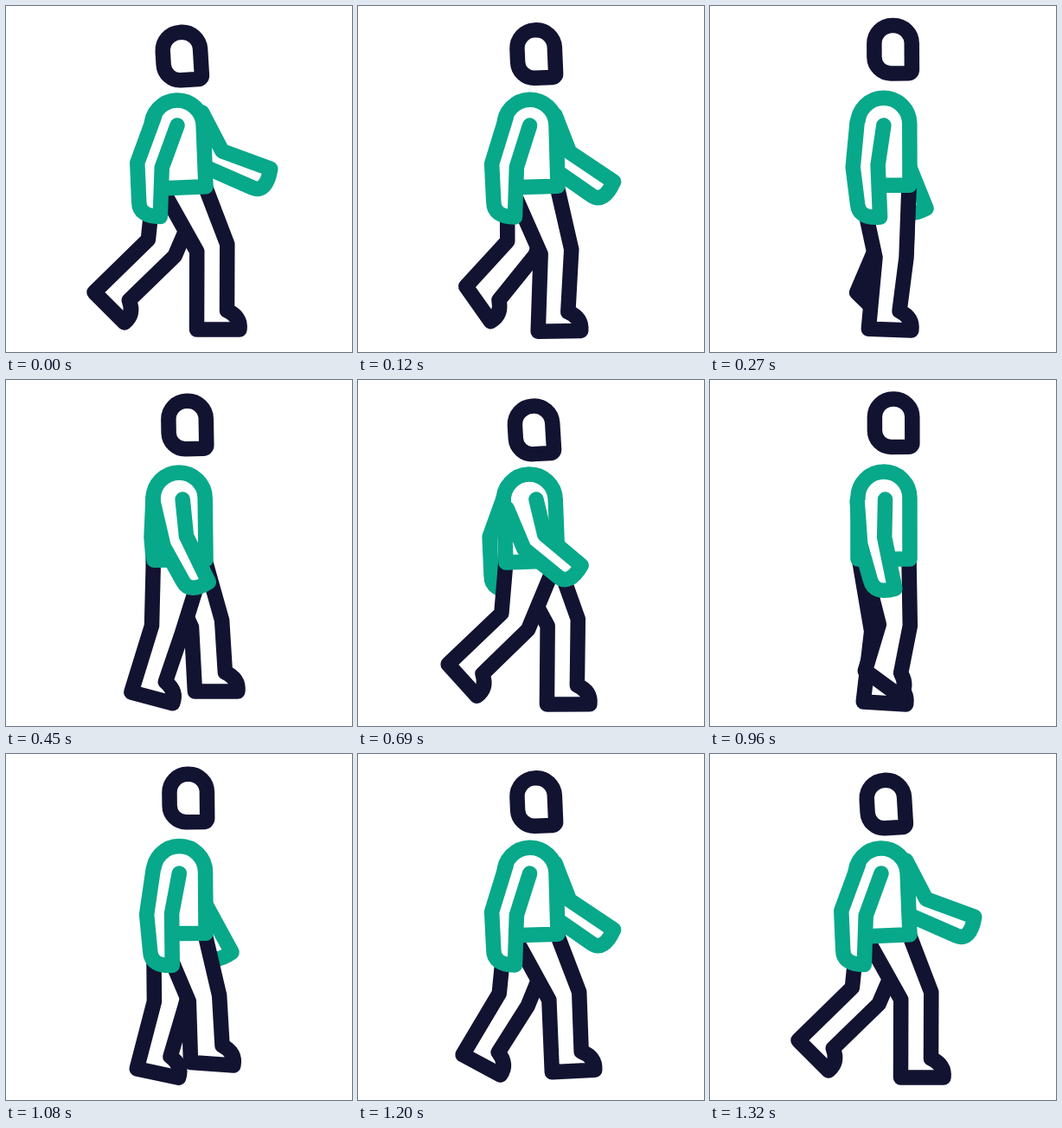
Animation of 400 by 400 pixels, one loop 1.35 s. Source, as an HTML page with a canvas:

```html
<!DOCTYPE html>
<html lang="en">
<head>
<meta charset="utf-8">
<title>Walking figure</title>
<style>
  html, body { margin: 0; width: 100%; height: 100%; overflow: hidden; background: #fff; }
  canvas { display: block; width: 100vw; height: 100vh; }
</style>
</head>
<body>
<canvas id="stage" width="400" height="400"></canvas>
<script>
const ctx = document.getElementById('stage').getContext('2d');
const NAVY = '#121331', GREEN = '#08a88a';
const STEP_MS = 30, STEPS = 45, CYCLE = 44;
const CHEST = { x: 200, y: 137, r: 30 };

// One stride of a foot, six evenly spaced moments from the front contact on
const HEEL_X = [220.5, 192.5, 147, 102, 155, 217];
const HEEL_Y = [374, 375, 362, 331, 326, 359];
const FOOT_ANGLE = [0, 0, 14, 45, 53, 1];

const rad = degrees => degrees * Math.PI / 180;
const mix = (a, b, t) => a + (b - a) * t;
const wave = (phase, harmonic = 1) => Math.cos(2 * Math.PI * harmonic * phase / CYCLE);
const polar = (x, y, length, angle) => [x + length * Math.cos(angle), y + length * Math.sin(angle)];

// Cyclic Catmull-Rom curve through evenly spaced values
function along(values, phase) {
  const n = values.length, pos = phase / CYCLE * n, i = Math.floor(pos), u = pos - i;
  const [a, b, c, d] = [-1, 0, 1, 2].map(k => values[(i + k + n) % n]);
  return b + u / 2 * (c - a + u * (2 * a - 5 * b + 4 * c - d + u * (3 * (b - c) + d - a)));
}

function paint(color) {
  ctx.fillStyle = '#fff';
  ctx.strokeStyle = color;
  ctx.fill();
  ctx.stroke();
}

function drawLeg(phase) {
  const kneeX = 209 + 30.5 * wave(phase + 2);
  const kneeY = 283.5 - 4 * wave(phase, 2) + 4 * wave(phase - CYCLE / 4);
  const heelX = along(HEEL_X, phase), heelY = along(HEEL_Y, phase);
  const angle = rad(along(FOOT_ANGLE, phase));
  const c = Math.cos(angle), s = Math.sin(angle);
  const foot = (x, y) => [heelX + x * c - y * s, heelY + x * s + y * c];

  // The knee's width follows the bisector of thigh and shin
  const [ankleX, ankleY] = foot(17.5, -11);
  const thigh = Math.atan2(202 - kneeX, kneeY - 208);
  const shin = Math.atan2(kneeX - ankleX, ankleY - kneeY);
  const tilt = (thigh + shin) / 2;

  ctx.beginPath();
  ctx.moveTo(174.5 + 4.5 * wave(phase + 4), 208);
  ctx.lineTo(...polar(kneeX, kneeY, -18, tilt));
  ctx.lineTo(heelX, heelY);
  ctx.lineTo(...foot(49.5, 0));
  ctx.quadraticCurveTo(...foot(51, -15), ...foot(35, -22));
  ctx.lineTo(...polar(kneeX, kneeY, 18, tilt));
  ctx.lineTo(230, 208);
  paint(NAVY);
}

// Point where a line from (x, y) touches the chest arch on the given side
function shoulder([x, y], side) {
  const dx = x - CHEST.x, dy = y - CHEST.y;
  const turn = Math.acos(CHEST.r / Math.hypot(dx, dy));
  return polar(CHEST.x, CHEST.y, CHEST.r, Math.atan2(dy, dx) + side * turn);
}

// The arm swings from a shared back pose to its own front pose
function drawArm(phase, front, inner) {
  const swing = (1 - wave(phase)) / 2;
  const bend = front.bend * swing ** 2.4;
  const elbowX = mix(166, front.x, swing), elbowY = mix(184, front.y, swing);
  const down = rad(90 - bend);
  const [handX, handY] = polar(elbowX, elbowY, mix(51, front.length, swing), down);
  const elbowTilt = rad(11 - 46 * swing), handTilt = rad(35 - 1.2 * bend);
  const backElbow = polar(elbowX, elbowY, -14.5, elbowTilt);
  const frontElbow = polar(elbowX, elbowY, 14.5, elbowTilt);
  const backHand = polar(handX, handY, -15, handTilt);

  ctx.beginPath();
  ctx.moveTo(...(inner || shoulder(frontElbow, -1)));
  ctx.lineTo(...frontElbow);
  ctx.lineTo(...polar(handX, handY, 15, handTilt));
  ctx.quadraticCurveTo(...polar(...backHand, 17, down), ...backHand);
  ctx.lineTo(...backElbow);
  ctx.lineTo(...shoulder(backElbow, 1));
  paint(GREEN);
}

function drawTorso(lift) {
  ctx.save();
  ctx.translate(201, 207 + 3 * (1 - lift));
  ctx.rotate(-0.04 * (1 - lift));
  ctx.beginPath();
  ctx.moveTo(-30, 0);
  ctx.lineTo(-30, -71);
  ctx.arc(0, -71, 30, Math.PI, 0);
  ctx.lineTo(30, 0);
  ctx.closePath();
  paint(GREEN);
  ctx.restore();
}

function drawHead(lift) {
  ctx.save();
  ctx.translate(203.3 + 9 * lift, 58 - 8.5 * lift);
  ctx.rotate(-0.06 * (1 - lift));
  ctx.beginPath();
  ctx.roundRect(-21.7, -27.7, 43.4, 55.4, [21, 21, 4, 19]);
  paint(NAVY);
  ctx.restore();
}

function draw(ms) {
  const phase = Math.floor(ms / STEP_MS) % STEPS % CYCLE;
  const opposite = (phase + CYCLE / 2) % CYCLE;
  const lift = (1 - wave(phase, 2)) / 2;
  ctx.fillStyle = '#fff';
  ctx.fillRect(0, 0, 400, 400);
  ctx.lineWidth = 17.5;
  ctx.lineCap = ctx.lineJoin = 'round';
  drawArm(opposite, { x: 238, y: 176, bend: 68, length: 62 });
  drawLeg(opposite);
  drawLeg(phase);
  drawTorso(lift);
  drawArm(phase, { x: 204, y: 187, bend: 51, length: 53 }, [202 - 4 * wave(phase), 138]);
  drawHead(lift);
}

const start = performance.now();
function tick() {
  draw(performance.now() - start);
  requestAnimationFrame(tick);
}
tick();
</script>
</body>
</html>
```
